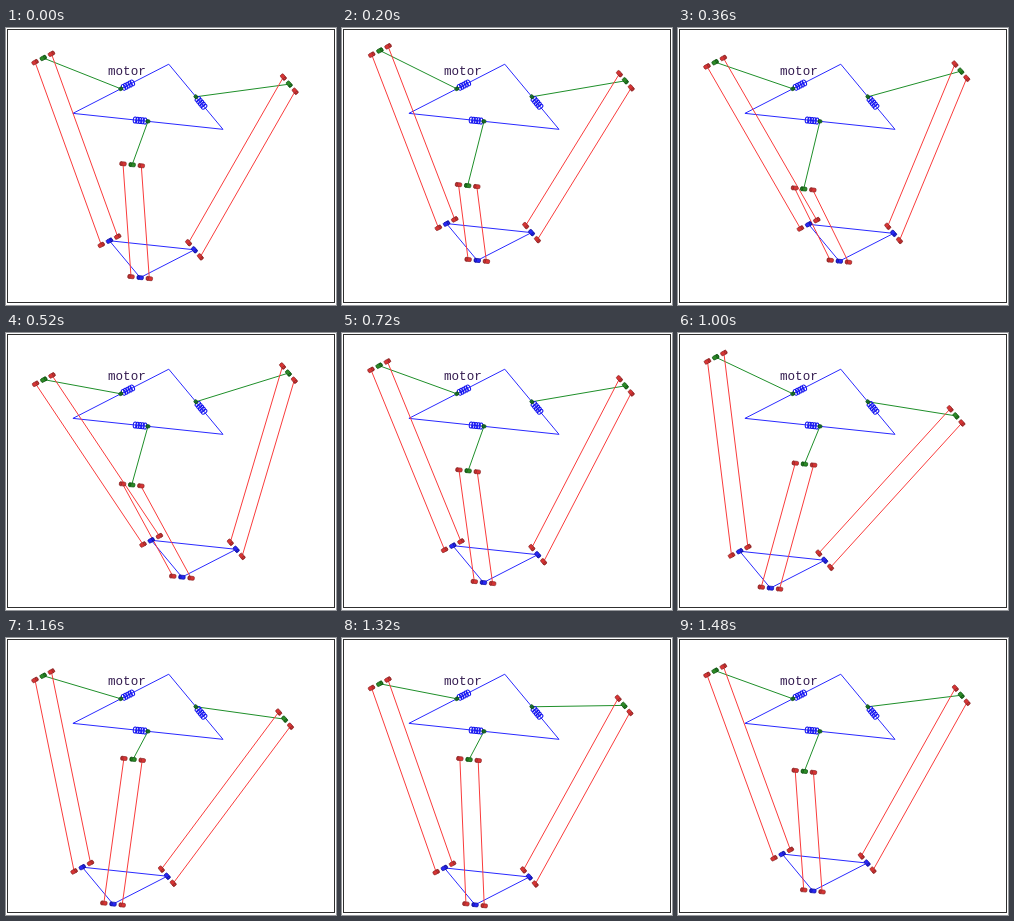
An HTML page with a canvas for the animation above (1520 ms loop, 330 px wide and 277 px high).

```html
<!DOCTYPE html>
<html lang="en">
<head>
<meta charset="utf-8">
<title>Delta robot</title>
<style>
  html, body { margin: 0; width: 100%; height: 100%; overflow: hidden; background: #fff; }
  canvas { display: block; width: 330px; height: 277px; }
</style>
</head>
<body>
<canvas id="stage" width="330" height="277"></canvas>
<script>
const ctx = document.getElementById('stage').getContext('2d');
const STEP = 40, STEPS = 38;
const RED = '#fa3c3c', GREEN = '#1f8f2a', BLUE = '#2a2aff';

// Robot dimensions in pixels
const BASE_R = 43.9, PLATE_R = 49.7, ARM = 100, HEIGHT = 171.8, BAR = 9.2;
const REACH = BASE_R - PLATE_R;
const ROD2 = (REACH + ARM) ** 2 + HEIGHT ** 2;
const { sin, cos, PI } = Math;

// Orthographic view of the 3D scene
const project = (x, y, z = 0) => [
  148.9 + 0.987 * x + 0.158 * y + 0.04 * z,
  74.3 + 0.105 * x - 0.434 * y - 0.895 * z
];

const legs = [150, 30, 270].map(deg => {
  const a = deg * PI / 180;
  const rx = cos(a), ry = sin(a), tx = ry, ty = -rx;
  const o = project(0, 0), p = project(tx, ty);
  const dx = p[0] - o[0], dy = p[1] - o[1], n = Math.hypot(dx, dy);
  return { rx, ry, tx, ty, dir: [dx / n, dy / n] };
});

// Figure-eight path of the platform: odd harmonics along its axis, even ones across
const ALONG = [44.9, -4.6, -1.1, 0.9], ACROSS = [21.97, -2.28, -1.16, 0.42];

function platformAt(k) {
  const t = 2 * PI * k / STEPS;
  const u = ALONG.reduce((sum, a, i) => sum + a * sin((2 * i + 1) * t), 0);
  const v = ACROSS.reduce((sum, a, i) => sum + a * sin((2 * i + 2) * t), 0);
  const c = cos(PI / 3), s = sin(PI / 3);
  return [u * c - v * s, u * s + v * c];
}

// Inverse kinematics: arm angle that keeps the rod length
function armAngle(leg, x, y) {
  const m = REACH - (x * leg.rx + y * leg.ry);
  const side = x * leg.tx + y * leg.ty;
  const k = (ROD2 - m * m - HEIGHT ** 2 - side * side - ARM * ARM) / (2 * ARM);
  return Math.atan2(HEIGHT, m) - Math.acos(k / Math.hypot(m, HEIGHT));
}

const along = (p, dir, d) => [p[0] + dir[0] * d, p[1] + dir[1] * d];

function line(color, pts, closed) {
  ctx.beginPath();
  pts.forEach(p => ctx.lineTo(p[0], p[1]));
  if (closed) ctx.closePath();
  ctx.strokeStyle = color;
  ctx.lineWidth = 1;
  ctx.stroke();
}

function joint(p, dir, fill, dark, len = 6.4, wide = 3.8) {
  ctx.save();
  ctx.translate(p[0], p[1]);
  ctx.rotate(Math.atan2(dir[1], dir[0]));
  ctx.beginPath();
  ctx.roundRect(-len / 2, -wide / 2, len, wide, 1.2);
  ctx.fillStyle = fill;
  ctx.fill();
  ctx.strokeStyle = dark;
  ctx.lineWidth = 0.7;
  ctx.stroke();
  ctx.beginPath();
  ctx.ellipse(len / 2 - 1.4, 0, 0.9, wide / 2, 0, 0, 2 * PI);
  ctx.stroke();
  ctx.restore();
}

function coil(p, dir) {
  ctx.save();
  ctx.translate(p[0], p[1]);
  ctx.rotate(Math.atan2(dir[1], dir[0]));
  ctx.strokeStyle = '#1414f0';
  ctx.lineWidth = 1;
  for (let i = 0; i < 5; i++) {
    ctx.beginPath();
    ctx.ellipse(3 + i * 2.5, 0, 1.8, 3.1, 0, 0, 2 * PI);
    ctx.stroke();
  }
  ctx.restore();
}

function draw(k) {
  const [x, y] = platformAt(k);
  ctx.fillStyle = '#fff';
  ctx.fillRect(0, 0, 330, 277);
  ctx.strokeStyle = '#303030';
  ctx.lineWidth = 1;
  ctx.strokeRect(1.5, 1.5, 327, 273);

  const pose = legs.map(leg => {
    const a = armAngle(leg, x, y);
    const r = BASE_R + ARM * cos(a);
    return {
      dir: leg.dir,
      corner: project(-2 * BASE_R * leg.rx, -2 * BASE_R * leg.ry),
      pivot: project(BASE_R * leg.rx, BASE_R * leg.ry),
      elbow: project(r * leg.rx, r * leg.ry, ARM * sin(a)),
      foot: project(x + PLATE_R * leg.rx, y + PLATE_R * leg.ry, -HEIGHT)
    };
  });

  line(BLUE, pose.map(p => p.corner), true);
  line(BLUE, pose.map(p => p.foot), true);

  for (const { dir, pivot, elbow, foot } of pose) {
    line(GREEN, [pivot, elbow]);
    for (const d of [-BAR, BAR]) line(RED, [along(elbow, dir, d), along(foot, dir, d)]);
  }
  for (const { dir, pivot, elbow, foot } of pose) {
    coil(pivot, dir);
    joint(pivot, dir, '#1f7f2f', '#0c4c1c', 4, 3.2);
    for (const p of [elbow, foot]) {
      for (const d of [-BAR, BAR]) joint(along(p, dir, d), dir, '#d83434', '#8c2626');
    }
    joint(elbow, dir, '#2c8a26', '#0c5010');
    joint(foot, dir, '#2828f4', '#10109c');
  }

  ctx.fillStyle = '#341c50';
  ctx.font = '12.6px "Liberation Mono", "Courier New", monospace';
  ctx.fillText('motor', 102, 46.6);
}

const start = performance.now();
function tick() {
  const t = Math.max(0, performance.now() - start);
  draw(Math.floor(t / STEP) % STEPS);
  requestAnimationFrame(tick);
}
tick();
</script>
</body>
</html>
```
